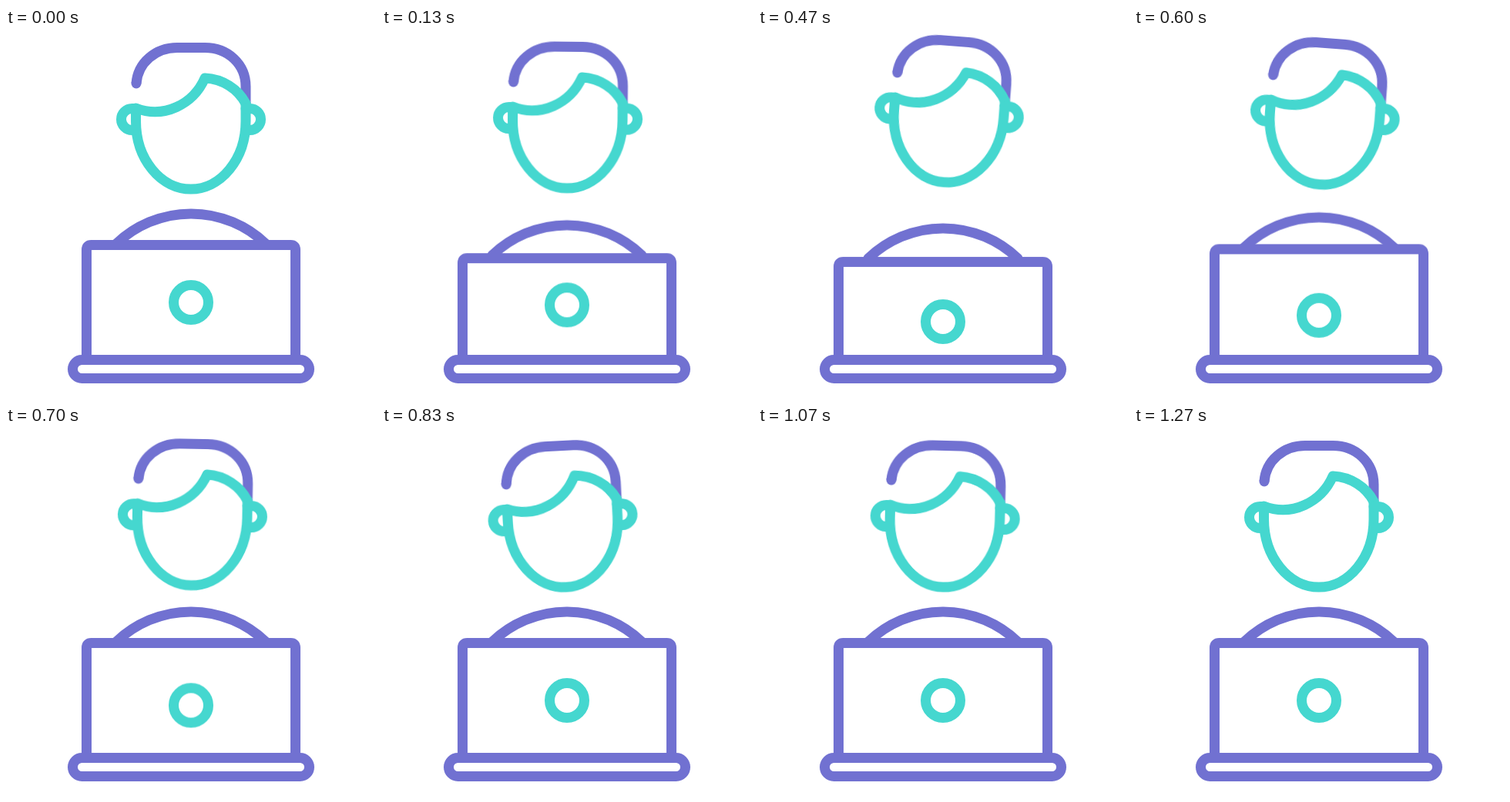
Animation, 480 px wide and 480 px high, one loop 1.53 s. Source, as an HTML page:

```html
<!DOCTYPE html>
<html lang="en">
<head>
<meta charset="utf-8">
<title>Working at a laptop</title>
<style>
  html, body { margin: 0; width: 100%; height: 100%; overflow: hidden; background: #fff; }
  svg { display: block; width: 100%; height: 100%; fill: none; stroke-width: 13; stroke-linecap: round; stroke-linejoin: round; }
  .violet { stroke: #7171d1; }
  .teal { stroke: #45d7cf; }

  .screen, .body, .ring, .lift, .tilt { animation: 1530ms cubic-bezier(.333, 0, .667, 1) infinite; }
  .screen { --dy: 29px; animation-name: dip; }
  .body { --dy: 25px; animation-name: dip; }
  .ring { --dy: 25px; animation-name: follow; }
  .lift { --dy: -9px; animation-name: follow; }
  .tilt { transform-origin: 240px 223px; animation-name: sway; }

  @keyframes dip {
    0%, 45.1%, 100% { transform: translateY(0); }
    15.25%, 24% { transform: translateY(var(--dy)); }
  }
  @keyframes follow {
    0%, 4.36%, 53.4%, 100% { transform: translateY(0); }
    22.88%, 30.5% { transform: translateY(var(--dy)); }
  }
  @keyframes sway {
    0%, 4.36%, 82.8%, 100% { transform: rotate(0deg); }
    22.88%, 38.2% { transform: rotate(4.4deg); }
    54.5% { transform: rotate(-3deg); }
    69.7% { transform: rotate(1.5deg); }
  }
</style>
</head>
<body>
<svg viewBox="0 0 480 480">
  <path class="violet body" d="M143 280A140 140 0 0 1 337 280"/>
  <path class="violet screen" stroke-linecap="butt" d="M104.5 428V287.5Q104.5 281.5 110.5 281.5H369.5Q375.5 281.5 375.5 287.5V428"/>
  <circle class="teal ring" cx="240" cy="356" r="22.5"/>
  <rect class="violet" x="86.5" y="430.5" width="307" height="24" rx="12" fill="#fff"/>

  <g class="lift">
    <g class="tilt">
      <path class="violet" stroke-linecap="butt" d="M169 72C171 45 194 25.5 222 25.5H258C288 25.5 311 47 311 76V98"/>
      <path class="violet" d="M169 72v0"/>
      <g class="teal">
        <path d="M168.5 104.5V121A71.25 88 0 0 0 311 121V98"/>
        <path d="M168.5 104C205 118 243 99 258 65C281 66 301 79 311 98"/>
        <path d="M168 104.5H163.5a14 14 0 0 0 0 28H168"/>
        <path d="M311 104.5H316.5a14 14 0 0 1 0 28H311"/>
      </g>
    </g>
  </g>
</svg>
</body>
</html>
```
